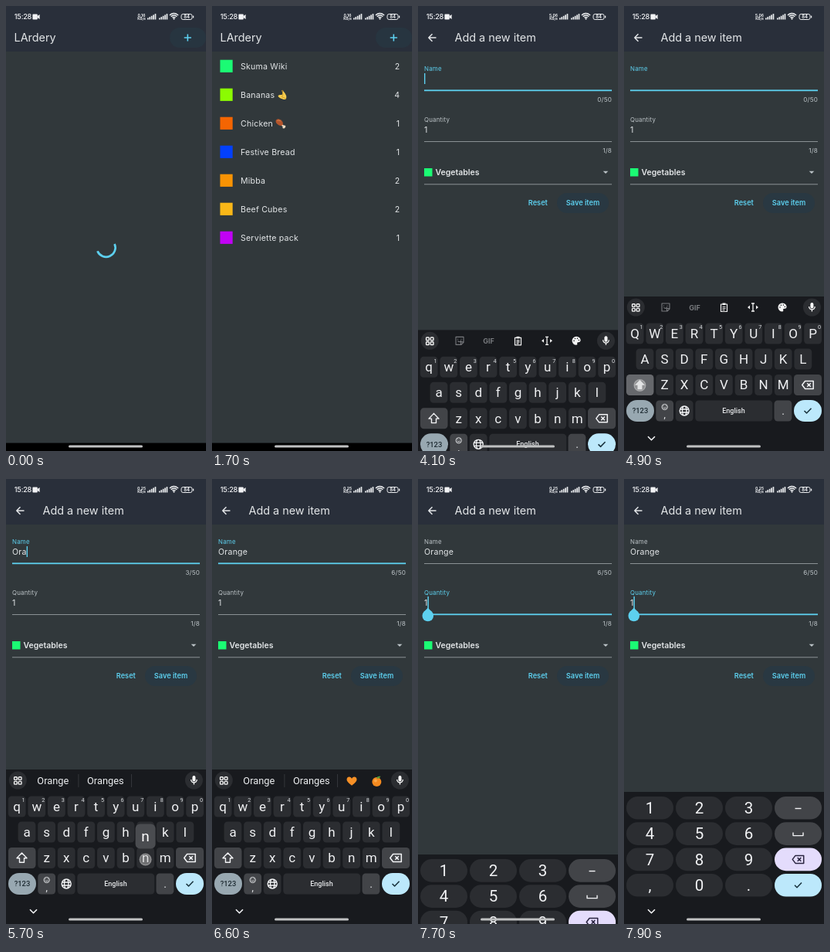
These frames come from a looping animation (259 by 576 pixels, 8 s). An HTML page with a canvas:

```html
<!DOCTYPE html>
<html lang="en">
<head>
<meta charset="utf-8">
<title>Shopping list</title>
<style>
  html, body { margin: 0; width: 100%; height: 100%; overflow: hidden; background: #31383b; }
  canvas { display: block; width: 259px; height: 576px; }
</style>
</head>
<body>
<canvas id="stage"></canvas>
<script>
const W = 259, H = 576, LOOP = 8000;
const UI = 'Inter, "Noto Sans", sans-serif', KEY = 'Roboto, "Noto Sans", sans-serif';
const CYAN = '#5dd0ef', BODY = '#31383b', BAR = '#292f3a', TEXT = '#e3e6e8', SOFT = '#bcc3c7';
const LINE = '#8a9194', PANEL = '#181a1e', KEYBG = '#2b2d31', FUNC = '#424448';

const cv = document.getElementById('stage'), c = cv.getContext('2d');
const dpr = Math.max(1, window.devicePixelRatio || 1);
cv.width = W * dpr;
cv.height = H * dpr;

const clamp = v => Math.min(1, Math.max(0, v));
const span = (t, a, b) => clamp((t - a) / (b - a));
const easeOut = p => 1 - (1 - p) ** 2;

// cubic-bezier(.4, 0, .2, 1)
function fastOut(x) {
  let lo = 0, hi = 1;
  for (let i = 0; i < 20; i++) {
    const m = (lo + hi) / 2, n = 1 - m;
    if (1.2 * n * n * m + 0.6 * n * m * m + m ** 3 < x) lo = m; else hi = m;
  }
  return 3 * (1 - lo) * lo * lo + lo ** 3;
}

function rect(x, y, w, h, color) {
  c.fillStyle = color;
  c.fillRect(x, y, w, h);
}
function pill(x, y, w, h, r, color) {
  c.fillStyle = color;
  c.beginPath();
  c.roundRect(x, y, w, h, r);
  c.fill();
}
function disc(x, y, r, color) {
  c.fillStyle = color;
  c.beginPath();
  c.arc(x, y, r, 0, 7);
  c.fill();
}
function text(s, x, y, size, color = TEXT, { w = 400, align = 'left', font = UI, gap = 0 } = {}) {
  c.font = `${w} ${size}px ${font}`;
  c.letterSpacing = gap + 'px';
  c.textAlign = align;
  c.fillStyle = color;
  c.fillText(s, x, y);
}
function path(d, color, width, x = 0, y = 0) {
  c.save();
  c.translate(x, y);
  const p = new Path2D(d);
  if (width) {
    c.strokeStyle = color;
    c.lineWidth = width;
    c.lineJoin = 'round';
    c.stroke(p);
  } else {
    c.fillStyle = color;
    c.fill(p);
  }
  c.restore();
}

const icons = {
  grid(x, y) {
    for (const dx of [-4.7, 1]) for (const dy of [-4.7, 1]) {
      c.strokeStyle = '#f2f2f2';
      c.lineWidth = 1.4;
      c.beginPath();
      c.roundRect(x + dx, y + dy, 3.7, 3.7, .8);
      c.stroke();
    }
  },
  mic(x, y) {
    pill(x - 2, y - 6, 4, 7.5, 2, '#fff');
    path('M-3.8-1A3.8 3.8 0 0 0 3.8-1M0 3V5.5', '#fff', 1.3, x, y);
  },
  sticker(x, y) {
    path('M-5-5H5V2L2 5H-5ZM5 1.5H1.5V5M-2.5 0Q0 3 2-.5M-2.5-2.5V-1.5M2-2.5V-1.5', '#77797d', 1.1, x, y);
  },
  clip(x, y) {
    path('M-4-4.5H4V5H-4ZM-2-1H2M-2 1H2M-2 3H1', '#f2f2f2', 1.2, x, y);
    rect(x - 2, y - 6, 4, 2.6, '#f2f2f2');
  },
  caret(x, y) {
    path('M-2-5H2M-2 5H2M0-5V5', '#f2f2f2', 1.3, x, y);
    path('M-7 0L-4-2.4V2.4ZM7 0L4-2.4V2.4Z', '#f2f2f2', 0, x, y);
  },
  palette(x, y) {
    path('M0-5.5A5.5 5.5 0 1 0 0 5.5Q2 5 1 3Q1 1.8 3 1.8Q5.6 1.8 5.6-.5Q5.3-5 0-5.5Z', '#f6f6f6', 0, x, y);
    for (const [dx, dy] of [[-3, 0], [-1.6, -2.8], [1.4, -3], [3.3, -.8]]) disc(x + dx, y + dy, .8, PANEL);
  },
  erase(x, y, color) {
    path('M-7.3 0L-3.5-5H7.2V5H-3.5ZM-.8-2.3L3.8 2.3M3.8-2.3L-.8 2.3', color, 1.5, x, y);
  },
  check(x, y) {
    path('M-4.5 0L-1.5 3L4.5-3.2', '#17303b', 1.5, x, y);
  },
  banana(x, y) {
    path('M-1-6Q1.5-6.5 1.6-4.5Q6.5 1 5 5Q3.5 7 .5 5.4Q-4.5 4-5.5 1.5Q-5-.5-2 0Q1 .5.2-3.5Z', '#f7cd4f', 0, x, y);
    path('M.3-4Q2 1-1 2.5Q2 3.6 4.6 5', '#c99320', .8, x, y);
    path('M-1-6L1-6.3L1.4-4.5L.2-4Z', '#8d6a24', 0, x, y);
  },
  drumstick(x, y) {
    path('M1 1L5 4.5', '#f0ddc4', 2.2, x, y);
    disc(x + 5.4, y + 4, 1.4, '#f0ddc4');
    disc(x + 4.4, y + 5.2, 1.4, '#f0ddc4');
    path('M-5.8-4Q-4-7 .2-4.8Q4-2.5 3.3 1.8Q1.6 3.8-2 2.2Q-6.8-.5-5.8-4Z', '#b4552c', 0, x, y);
    path('M-4-3.5Q-2.4-5 .3-3', '#d98550', 1, x, y);
  },
  heart(x, y) {
    path('M0 5.8Q-6.8 1-6.5-2.2Q-6-5.5-3-5.4Q-.8-5.2 0-3.2Q.8-5.2 3-5.4Q6-5.5 6.5-2.2Q6.8 1 0 5.8Z', '#f79026', 0, x, y);
  },
  tangerine(x, y) {
    disc(x, y + 1, 6, '#f58a1f');
    disc(x - 1.5, y - .5, 2, '#fba94a');
    path('M0-3.2Q0-7 5-6.2Q4-3 0-3.2Z', '#4f9b3c', 0, x, y);
  }
};

function dot(t, x, y, a, b) {
  if (t < a || t >= b) return;
  disc(x, y, 8, 'rgba(205,205,205,.42)');
  c.strokeStyle = 'rgba(225,225,225,.35)';
  c.lineWidth = 1;
  c.beginPath();
  c.arc(x, y, 7.2, 0, 7);
  c.stroke();
}

function statusBar(t) {
  text('15:28', 10.8, 17.3, 9.2, '#f1f2f4', { w: 500, gap: -.25 });
  pill(34.4, 10.6, 6.4, 6.8, 1, '#f1f2f4');
  path('M40.6 13L43.6 11V17L40.6 15Z', '#f1f2f4');
  const rate = t < 2300 ? '0.16' : t < 5300 ? '5.06' : '0.25';
  text(rate, 175.5, 13.6, 5, '#eef0f2', { w: 700, align: 'center' });
  text('KB/s', 175.5, 18, 4.5, '#eef0f2', { w: 700, align: 'center' });
  for (const x of [183, 198])
    for (let i = 0; i < 5; i++) rect(x + i * 2.4, 15.5 - i * 1.35, 1.7, 2 + i * 1.35, '#eef0f2');
  c.strokeStyle = '#eef0f2';
  c.lineWidth = 1.5;
  for (const r of [2.6, 5, 7.4]) {
    c.beginPath();
    c.arc(217.5, 17, r, -Math.PI * .77, -Math.PI * .23);
    c.stroke();
  }
  disc(217.5, 16.6, 1.1, '#eef0f2');
  c.lineWidth = 1;
  c.beginPath();
  c.roundRect(227, 10.5, 14, 7, 2.2);
  c.stroke();
  rect(242, 12.6, 1.2, 2.8, '#eef0f2');
  text('84', 234, 16.1, 5.8, '#eef0f2', { w: 700, align: 'center' });
}

function page() {
  rect(0, 0, W, 566, BODY);
  rect(0, 0, W, 59, BAR);
}

function spinner(t) {
  const u = t + 287, p = u / 1333 % 1, turn = Math.PI * 1.5;
  const head = fastOut(clamp(p * 2)) * turn, tail = fastOut(clamp(p * 2 - 1)) * turn;
  const start = -Math.PI / 2 + tail + u / 2222 * 2 * Math.PI + p * Math.PI / 2;
  c.strokeStyle = CYAN;
  c.lineWidth = 2.7;
  c.beginPath();
  c.arc(129.6, 312.8, 12, start, start + Math.max(head - tail, .01));
  c.stroke();
}

const items = [
  ['Skuma Wiki', 2, '#1bfb74'], ['Bananas', 4, '#8bfb02'], ['Chicken', 1, '#f56502'],
  ['Festive Bread', 1, '#0340fb'], ['Mibba', 2, '#f99304'], ['Beef Cubes', 2, '#f9b718'],
  ['Serviette pack', 1, '#c102f5']
];

function listPage(t) {
  page();
  text('LArdery', 10.5, 46.2, 14.4);
  pill(212, 28, 47, 26, 13, t >= 2700 ? '#2d4453' : '#273540');
  path('M-4.6 0H4.6M0-4.6V4.6', CYAN, 1.6, 235.3, 41);
  if (t < 1000) return spinner(t);
  items.forEach(([name, n, color], i) => {
    const y = 78 + i * 37;
    rect(10.5, y - 8.3, 16.2, 16.2, color);
    text(name, 37, y + 4, 10.6, TEXT, { gap: .2 });
    text(n, 243, y + 4, 10.4, TEXT, { align: 'right' });
  });
  icons.banana(91, 115);
  icons.drumstick(88.5, 152);
}

const WORD = 'Orange', TYPED = [5150, 5420, 5580, 5720, 5870, 6020];
const typedCount = t => TYPED.filter(k => t >= k).length;

function field(label, value, y, count, focus, lift) {
  const color = focus ? CYAN : SOFT;
  text(label, 8, y - 16 - 9 * lift, 10.6 - 2.7 * lift, color, { gap: .2 });
  text(value, 8, y - 10.6, 10.6, TEXT, { gap: .2 });
  if (focus) rect(8, y - .6, 243, 1.8, CYAN);
  else rect(8, y, 243, 1, LINE);
  text(count, 251, y + 14.5, 8.1, SOFT, { align: 'right', gap: .2 });
}

function formPage(t) {
  page();
  path('M5 0H-4.6M0-4.7L-4.7 0L0 4.7', TEXT, 1.5, 18.5, 41);
  text('Add a new item', 47.5, 46.2, 14.4);

  const n = typedCount(t), word = WORD.slice(0, n);
  const onName = t >= 3900 && t < 6920, onQty = t >= 7600;
  field('Name', word, 109, n + '/50', onName, fastOut(span(t, 3900, 4070)));
  field('Quantity', '1', 175, '1/8', onQty, 1);
  if (onName) {
    const since = t - (n ? TYPED[n - 1] : 3920);
    if (Math.floor(since / 500) % 2 <= 0) {
      c.font = `400 10.6px ${UI}`;
      c.letterSpacing = '.2px';
      rect(8 + c.measureText(word).width, 87, 1.4, 14, CYAN);
    }
  }

  rect(8, 210, 10.5, 10.5, '#1bfb74');
  text('Vegetables', 22.5, 219.2, 10.5, TEXT, { w: 600 });
  path('M239.7 213.7H246.3L243 217Z', SOFT);
  rect(8, 230.3, 243, 1, LINE);
  text('Reset', 155.3, 258, 9.2, CYAN, { w: 600, align: 'center' });
  pill(180, 242, 67, 26, 13, '#293842');
  text('Save item', 213.5, 258, 9.2, CYAN, { w: 600, align: 'center' });

  if (onQty) {
    rect(12.4, 152, 1.5, 16, CYAN);
    disc(12.8, 177, 7.3, CYAN);
    path('M12.8 166.8L18 172H7.6Z', CYAN);
  }
}

// Zoom-style change from the list to the form
function pages(t) {
  const p = span(t, 2900, 3200), e = fastOut(p);
  const zoomed = (k, draw) => {
    c.save();
    c.translate(W / 2, 283);
    c.scale(k, k);
    c.translate(-W / 2, -283);
    draw(t);
    c.restore();
  };
  if (p < 1) zoomed(1 + .05 * e, listPage);
  if (p > 0) {
    if (p < 1) rect(0, 0, W, 566, `rgba(0,0,0,${.6 * span(p, .2, .42)})`);
    c.globalAlpha = span(p, .12, .25);
    zoomed(.85 + .15 * e, formPage);
    c.globalAlpha = 1;
  }
}

function toolbar(n) {
  disc(15.3, 390, 11.5, KEYBG);
  icons.grid(15.3, 390.4);
  disc(243.4, 390, 11.5, KEYBG);
  icons.mic(243.4, 390);
  if (n < 0) return;
  if (!n) {
    icons.sticker(54, 390);
    text('GIF', 91.5, 393.5, 9, '#77797d', { w: 700, align: 'center' });
    icons.clip(129.5, 390.5);
    icons.caret(167, 390);
    icons.palette(205, 390);
    return;
  }
  const words = n < 3 ? ['Or', 'On'] : ['Orange', 'Oranges'];
  words.forEach((s, i) => text(s, 60.8 + i * 68, 395, 12.8, '#eceef0', { align: 'center', font: KEY }));
  for (const x of [93.5, 162]) rect(x, 382, .8, 17, '#3b3d41');
  if (n === 6) {
    icons.heart(181, 391);
    icons.tangerine(213.3, 391);
  }
}

const rows = [['qwertyuiop', 14.2, 424], ['asdfghjkl', 27, 457], ['zxcvbnm', 52.6, 490.5]];
const PITCH = 25.6;

function keyAt(ch) {
  for (const [s, x, y] of rows) {
    const i = s.indexOf(ch);
    if (i >= 0) return [x + i * PITCH, y];
  }
}

function letters(t) {
  const n = typedCount(t), caps = t >= 4850 && !n;
  toolbar(t >= 6920 ? -1 : n);
  for (const [s, x0, y] of rows) [...s].forEach((ch, i) => {
    const x = x0 + i * PITCH;
    pill(x - 11.4, y - 13.5, 22.8, 27, 4.5, KEYBG);
    text(caps ? ch.toUpperCase() : ch, x, y + 5.7, 17, '#f0f1f3', { align: 'center', font: KEY });
    if (y === 424) text((i + 1) % 10, x + 8.4, y - 5.8, 7.2, '#dcdfe2', { align: 'center', font: KEY });
  });
  const held = t >= 4800 && t < 5000;
  pill(3, 477, 35.5, 27, 4.5, held ? '#66686c' : FUNC);
  path('M0-6.5L6.5.3H3V5.8H-3V.3H-6.5Z', '#f2f3f5', caps ? 0 : 1.4, 20.5, 490.5);
  pill(220, 477, 36, 27, 4.5, FUNC);
  icons.erase(238, 490.5, '#f2f3f5');

  pill(3, 510, 36, 28, 14, '#98a8b1');
  text('?123', 21, 527.3, 9.4, '#1e2b32', { w: 500, align: 'center', font: KEY });
  for (const x of [41.3, 66.8, 194.5]) pill(x, 510.5, 22.8, 27, 4.5, x > 60 && x < 70 ? KEYBG : FUNC);
  pill(92.3, 510.5, 100, 27, 4.5, KEYBG);
  text('English', 142, 527, 9, '#e6e8ea', { w: 500, align: 'center', font: KEY });
  text('.', 206, 529, 14, '#f0f1f3', { align: 'center', font: KEY });
  text(',', 52.7, 533, 12, '#f0f1f3', { align: 'center', font: KEY });
  path('M3.6 0A3.6 3.6 0 1 1-3.6 0A3.6 3.6 0 1 1 3.6 0M-1.8.7Q0 2.7 1.8.7M-1.3-1.6V-.8M1.3-1.6V-.8', '#e6e8ea', 1, 52.7, 519);
  path('M6 0A6 6 0 1 1-6 0A6 6 0 1 1 6 0M2.7 0A2.7 6 0 1 1-2.7 0A2.7 6 0 1 1 2.7 0M-5.5-2H5.5M-5.5 2H5.5', '#f2f3f5', 1.4, 78.2, 524);
  pill(220, 510, 36, 28, 14, '#bce8fb');
  icons.check(238, 524);

  TYPED.forEach((at, i) => {
    if (t < at - 40 || t >= at + 60) return;
    const [x, y] = keyAt(WORD[i].toLowerCase());
    pill(x - 13, y - 44, 26, 32, 6, '#4a4c50');
    text(WORD[i], x, y - 22, 19, '#fff', { align: 'center', font: KEY });
    dot(t, x, y + 2, 0, LOOP);
  });
}

function numpad() {
  ['123–', '456_', '789<', ',0.+'].forEach((row, r) => [...row].forEach((ch, i) => {
    const x = 3 + i * 64, y = 411 + r * 33.3;
    pill(x, y, 61, 29.6, 14.8, ch === '<' ? '#e4dcfc' : ch === '+' ? '#bce8fb' : i > 2 ? FUNC : KEYBG);
    const mx = x + 30.5, my = y + 14.8;
    if (ch === '<') icons.erase(mx, my, '#2a2440');
    else if (ch === '+') icons.check(mx, my);
    else if (ch === '_') path('M-6.5-1.5V2.5H6.5V-1.5', '#f2f3f5', 1.4, mx, my);
    else if (ch === '–') rect(mx - 4, my, 8, 1.4, '#f2f3f5');
    else text(ch, mx, my + 7.2, 20.5, '#f2f3f5', { align: 'center', font: KEY });
  }));
}

function keyboard(t, top, shown, draw) {
  if (shown <= 0) return;
  c.save();
  c.translate(0, (H - top) * (1 - shown));
  rect(0, top, W, H - top, PANEL);
  draw(t);
  path('M-4.5-2.2L0 2.3L4.5-2.2', '#f2f3f5', 1.6, 35.5, 559.5);
  c.restore();
}

function draw(t) {
  c.setTransform(dpr, 0, 0, dpr, 0, 0);
  rect(0, 0, W, H, '#000');
  pages(t);
  statusBar(t);
  rect(0, 565.6, W, 11, '#000');
  keyboard(t, 376, easeOut(span(t, 3930, 4250)) - easeOut(span(t, 6930, 7050)), letters);
  keyboard(t, 405, easeOut(span(t, 7620, 7880)), numpad);
  pill(81, 568.4, 96, 3, 1.5, '#c0c1c2');
  dot(t, 235, 42, 2700, 2860);
  dot(t, 70, 98, 3720, 3900);
  dot(t, 20.5, 491, 4800, 5000);
  dot(t, 241, 532, 6900, 7060);
  dot(t, 60, 162, 7500, 7620);
}

const begin = performance.now();
function tick() {
  draw((performance.now() - begin) % LOOP);
  requestAnimationFrame(tick);
}
tick();
</script>
</body>
</html>
```
